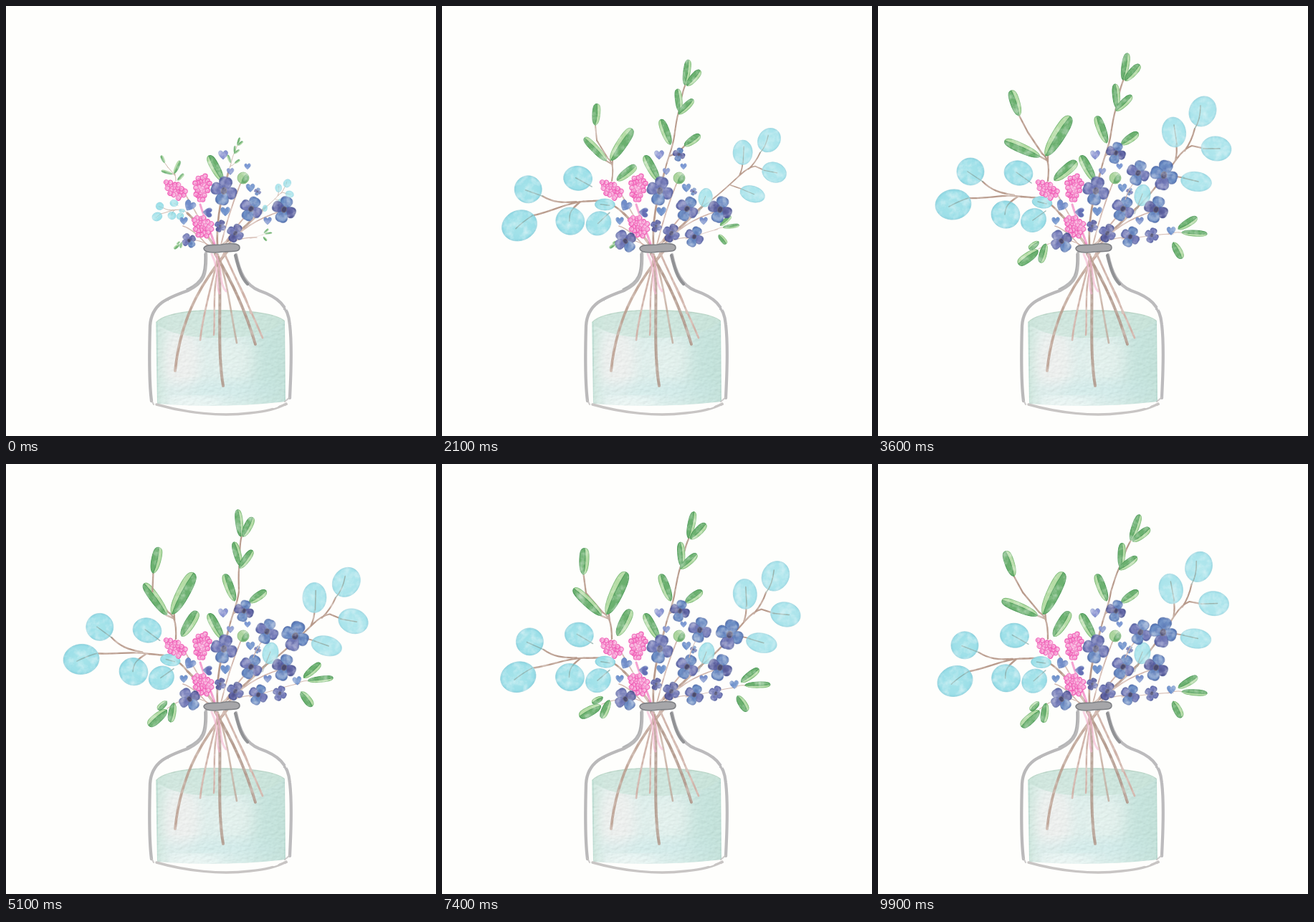
Recreate the animation shown at these times as an HTML page. Size 600 by 600 pixels, loop 10000 ms.

```html
<!DOCTYPE html>
<html lang="en">
<head>
<meta charset="utf-8">
<title>Bouquet in a glass jar</title>
<style>
  html, body { margin: 0; width: 100%; height: 100%; overflow: hidden; background: #fefefc; }
  svg { display: block; width: 100vw; height: 100vh; }
  .line { fill: none; stroke-linecap: round; stroke-linejoin: round; }
</style>
</head>
<body>
<svg id="stage" viewBox="0 0 600 600" xmlns="http://www.w3.org/2000/svg">
  <defs>
    <filter id="wash" filterUnits="userSpaceOnUse" x="0" y="0" width="600" height="600" color-interpolation-filters="sRGB">
      <feTurbulence type="fractalNoise" baseFrequency=".1" numOctaves="3" seed="4"/>
      <feColorMatrix values="0 0 0 0 1  0 0 0 0 1  0 0 0 0 1  1 0 0 0 -.4"/>
      <feComposite in2="SourceAlpha" operator="in" result="light"/>
      <feMerge><feMergeNode in="SourceGraphic"/><feMergeNode in="light"/></feMerge>
    </filter>
    <filter id="paper" filterUnits="userSpaceOnUse" x="190" y="410" width="215" height="160" color-interpolation-filters="sRGB">
      <feTurbulence type="fractalNoise" baseFrequency=".16 .24" numOctaves="2" seed="9"/>
      <feDiffuseLighting surfaceScale=".9" lighting-color="#fff" result="relief">
        <feDistantLight azimuth="235" elevation="60"/>
      </feDiffuseLighting>
      <feComposite in="SourceGraphic" in2="relief" operator="arithmetic" k2="1" k3=".2" k4="-.17"/>
      <feComposite in2="SourceAlpha" operator="in"/>
    </filter>
    <filter id="rough" filterUnits="userSpaceOnUse" x="180" y="320" width="240" height="260" color-interpolation-filters="sRGB">
      <feTurbulence type="fractalNoise" baseFrequency=".06" numOctaves="1" seed="2"/>
      <feDisplacementMap in="SourceGraphic" scale="2" xChannelSelector="R" yChannelSelector="G"/>
    </filter>
    <filter id="soft" x="-50%" y="-50%" width="200%" height="200%"><feGaussianBlur stdDeviation="9"/></filter>
    <radialGradient id="disc">
      <stop offset="0" stop-color="#a3e3e9"/><stop offset=".85" stop-color="#97dee7"/><stop offset="1" stop-color="#85d0de"/>
    </radialGradient>
    <radialGradient id="petalBlue">
      <stop offset="0" stop-color="#5675b4"/><stop offset=".7" stop-color="#678bc4"/><stop offset="1" stop-color="#4c6eb0"/>
    </radialGradient>
    <radialGradient id="petalViolet">
      <stop offset="0" stop-color="#5f68aa"/><stop offset=".7" stop-color="#7379b9"/><stop offset="1" stop-color="#535ca0"/>
    </radialGradient>
    <radialGradient id="petalDark">
      <stop offset="0" stop-color="#494e8e"/><stop offset=".7" stop-color="#5d62a5"/><stop offset="1" stop-color="#464b8c"/>
    </radialGradient>
    <linearGradient id="waterTone">
      <stop offset="0" stop-color="#c9e3d8"/><stop offset=".12" stop-color="#dfedea"/>
      <stop offset=".6" stop-color="#d9ece9"/><stop offset="1" stop-color="#c2dfd7"/>
    </linearGradient>
    <clipPath id="waterEdge">
      <path d="M209 441C222 427 265 423 300 424C340 424 378 429 389 439L390 552Q300 562 211 555Z"/>
    </clipPath>
  </defs>
  <g id="water" clip-path="url(#waterEdge)"></g>
  <g id="plants" filter="url(#wash)"></g>
  <g id="glass" filter="url(#rough)"></g>
</svg>
<script>
const LOOP = 10000, STEP = 100;
const BEATS = [0, 2.1, 3.6, 5.1, 7.4, 8.3, 9.9];
const STILL = [0, 0, 0, 0, 0, 0, 0];
const BROWN = '#b89a8b', ROSE = '#cfb2a8', TAUPE = '#ad9385';
const plants = document.getElementById('plants');
const parts = [];

function add(parent, tag, attrs) {
  const node = document.createElementNS('http://www.w3.org/2000/svg', tag);
  for (const key in attrs) node.setAttribute(key, attrs[key]);
  return parent.appendChild(node);
}

function line(parent, d, width = 2, stroke = BROWN, opacity = 1) {
  return add(parent, 'path', { class: 'line', d, stroke, 'stroke-width': width, opacity });
}

// A group that turns and grows about one point; grow = [first scale, start s, end s].
function part(parent, x, y, sway = STILL, grow = [1, 0, 1]) {
  const node = add(parent, 'g', {});
  parts.push({ node, x, y, sway, grow });
  return node;
}

function leaf(parent, x1, y1, x2, y2, w, flip = 1) {
  const len = Math.hypot(x2 - x1, y2 - y1);
  const turn = Math.atan2(y2 - y1, x2 - x1) * 180 / Math.PI;
  const g = add(parent, 'g', { transform: `translate(${x1} ${y1}) rotate(${turn})` });
  const h = w / 2 * flip;
  const side = s => `M0 0C${len * .05} ${-s * .8} ${len * .3} ${-s} ${len * .6} ${-s}C${len * .88} ${-s} ${len} ${-s * .75} ${len} 0`;
  add(g, 'path', { d: side(-h), fill: '#b5dca5', stroke: '#80bd7c', 'stroke-width': 1 });
  add(g, 'path', { d: `${side(h)}Q${len * .5} ${h * .5} 0 0Z`, fill: '#6bb06f', stroke: '#519c5c', 'stroke-width': 1 });
}

function disc(parent, x, y, rx, ry, turn = 0, opacity = .95) {
  add(parent, 'ellipse', { cx: x, cy: y, rx, ry, fill: 'url(#disc)', stroke: '#86ccd8',
    'stroke-width': .7, opacity, transform: `rotate(${turn} ${x} ${y})` });
}

function flower(parent, x, y, r, turn = 0, tones = ['Blue', 'Violet']) {
  const g = add(parent, 'g', { transform: `translate(${x} ${y}) rotate(${turn}) scale(${r / 20})` });
  for (let i = 0; i < 4; i++) {
    add(g, 'path', { d: 'M0 3C-4 -1 -9 -7 -9 -13C-9 -18 -4 -20 0 -19C5 -20 9 -17 9 -12C8 -6 4 -1 0 3Z',
      transform: `rotate(${i * 90 + (i % 2 ? 6 : 0)}) scale(${i % 2 ? .92 : 1})`,
      fill: `url(#petal${tones[i % tones.length]})`, stroke: '#52669f', 'stroke-width': .5, opacity: .94 });
  }
  add(g, 'ellipse', { cx: 0, cy: 0, rx: 3.6, ry: 4.4, fill: '#4a4a70', stroke: '#6f6e80', 'stroke-width': 1 });
}

function heart(parent, x, y, s, fill = '#7093cd', turn = 0) {
  add(parent, 'path', { d: 'M0 5C-7 0 -6 -5 -3 -5C-1 -5 0 -3 0 -2C0 -4 2 -6 4 -5C7 -3 5 1 0 5Z', fill,
    stroke: '#6583bd', 'stroke-width': .5, transform: `translate(${x} ${y}) rotate(${turn}) scale(${s / 10})` });
}

function cluster(x, y, rx, ry, turn) {
  const g = add(plants, 'g', { transform: `translate(${x} ${y}) rotate(${turn})` });
  const n = Math.round(rx * ry / 7);
  for (let i = 0; i < n; i++) {
    const d = Math.sqrt((i + .5) / n), a = i * 2.4;
    const cy = d * ry * Math.sin(a), cx = d * rx * Math.cos(a) * (1 - .25 * cy / ry);
    add(g, 'circle', { cx, cy, r: 3.2, fill: '#f58ccb', stroke: '#f05cb5', 'stroke-width': 1.1 });
    add(g, 'path', { class: 'line', d: `M${cx - 1.5} ${cy + .8}q.4 -2.8 2.8 -1.6`, stroke: '#fac6e6', 'stroke-width': 1 });
  }
}

function drawWater() {
  const g = add(document.getElementById('water'), 'g', { filter: 'url(#paper)' });
  add(g, 'rect', { x: 205, y: 420, width: 190, height: 142, fill: 'url(#waterTone)' });
  const blot = (cx, cy, rx, ry, fill, opacity) =>
    add(g, 'ellipse', { cx, cy, rx, ry, fill, opacity, filter: 'url(#soft)' });
  blot(246, 495, 25, 45, '#f1efee', .75);
  blot(318, 493, 32, 28, '#eaf2ee', .5);
  blot(367, 500, 22, 50, '#bfe0d9', .5);
  blot(300, 536, 85, 9, '#c9e7e8', .55);
  blot(265, 553, 40, 5, '#fff', .9);
  add(g, 'path', { d: 'M209 442C222 427 265 423 300 424C340 424 378 429 389 439C370 457 340 463 299 463C255 463 224 457 209 442Z',
    fill: '#c8e2d8', opacity: .65 });
  line(g, 'M210 441C222 428 265 424 300 425C340 425 378 429 388 439', 1.4, '#b9d4c5', .8);
  line(g, 'M211 442V552M389 441V550', 2, '#b2d6cb', .5);
}

function drawStems() {
  line(plants, 'M309 342C285 373 245 420 236 509', 3.7, BROWN, .85);
  line(plants, 'M295 347C303 395 293 470 303 530', 4, TAUPE, .85);
  line(plants, 'M292 346C313 380 334 425 348 472', 3.9, TAUPE, .9);
  line(plants, 'M306 348C325 390 344 430 358 463', 2.8, ROSE);
  line(plants, 'M296 348C289 385 275 425 271 466', 2.6, ROSE);
  line(plants, 'M304 345C285 385 293 425 290 459', 2.4, ROSE);
  line(plants, 'M297 350C310 390 314 430 322 470', 2.6, BROWN, .7);
  line(plants, 'M306 347C318 380 337 403 341 429', 1.8, ROSE);
  line(plants, 'M287 346C299 370 292 390 298 401M293 347C303 373 297 387 307 398', 3, '#f4b3cf', .6);
  line(plants, 'M291 335C279 318 266 301 253 289M301 334C332 312 348 293 362 281', 3.1, BROWN);
  line(plants, 'M289 335C275 305 258 275 240 246M281 334C271 322 259 311 247 307', 1.6, ROSE);
  line(plants, 'M295 333C293 300 300 266 311 230', 2.7, BROWN);
  line(plants, 'M300 333C308 300 318 270 328 246M304 333C318 311 331 296 342 285M309 333C326 314 347 297 388 285', 1.8, ROSE);
  line(plants, 'M284 334Q270 326 256 326M306 334Q326 322 350 323', 1.2, ROSE);
  line(plants, 'M291 332C286 315 278 300 271 277M291 333L285 315', 3, '#f177bd', .7);
}

function drawLeftDiscs() {
  const g = part(plants, 253, 289, [-7.5, -7, 0, 1, -5, -5.5, -6], [.29, 0, 2]);
  line(g, 'M253 289C244 278 232 267 213 267L200 266M195 266Q189 270 183 275', 2.5);
  disc(g, 178, 291, 20, 19, 20);
  disc(g, 196, 233, 20, 17, 12);
  disc(g, 217, 299, 18, 16, -28);
  disc(g, 229, 274, 14, 8, 8);
  line(g, 'M185 274Q178 278 177 291M214 247L193 232M234 286L216 299M235 276L223 273', 1.5, '#87a9a6', .8);
  const outer = part(g, 200, 266, [-6, -7, 0, 1.2, -4.5, -6, -6.5]);
  line(outer, 'M200 266C176 262 156 269 126 268M190 264C170 261 158 257 146 245', 2.3);
  disc(outer, 105, 277, 25, 21, -8);
  disc(outer, 129, 231, 19, 19);
  line(outer, 'M126 268Q111 273 99 280M146 245L125 231', 1.5, '#87a9a6', .8);
}

function drawRightDiscs() {
  const grow = [.28, .85, 2.7], pale = .82;
  const top = part(plants, 362, 281, [8, 11, 0, 10, 5.5, 1.3, -2.3], grow);
  line(top, 'M362 281C382 262 401 235 417 213C425 202 432 197 438 195L456 199M428 202Q438 188 442 171M415 215Q418 203 416 193', 2.2);
  disc(top, 413, 176, 16.5, 21, -10, pale);
  disc(top, 453, 147, 18.5, 21.5, 25, pale);
  disc(top, 472, 199, 21, 17, 8, pale);
  line(top, 'M417 193L413 166M442 171Q450 159 450 139M454 199H477', 1.5, '#94aaa2', .85);
  const low = part(plants, 362, 281, [4, 9, 0, 6, 3.2, .5, -1], grow);
  line(low, 'M405 236L428 240', 1.8);
  disc(low, 444, 245, 21.5, 13.5, 8, pale);
  line(low, 'M426 240L447 245', 1.5, '#94aaa2', .8);
  const small = part(plants, 358, 290, STILL, [.3, .5, 2.7]);
  disc(small, 369, 264, 11, 15, 10, pale);
  line(small, 'M358 290L369 262', 1.2, '#a8b6b0', .8);
}

function drawLeftBlades() {
  const bend = [0, 20, 0, 34, 27, 15, 5];
  const body = part(plants, 237, 244, [-8, 2, 0, -4, -7, -7, -6], [.3, .5, 2.9]);
  line(body, 'M237 244C240 219 236 211 229 206L209 176M237 216L226 210M237 218V207', 2.3);
  leaf(part(body, 227, 211, bend), 226, 210, 177, 188, 13);
  leaf(body, 234, 209, 268, 154, 18, -1);
  const tip = part(body, 209, 176, bend);
  line(tip, 'M209 176L197 153', 2.3);
  leaf(tip, 197, 153, 186, 118, 13);
  const side = part(body, 237, 244, [0, 0, 0, -14, -16, -13, -11]);
  leaf(side, 246, 243, 277, 217, 14);
}

function drawTopBlades() {
  const base = part(plants, 311, 230, STILL, [.29, .7, 2.4]);
  line(base, 'M311 230C315 210 322 200 325 178M318 208Q332 203 341 192', 2.2);
  leaf(base, 319, 191, 305, 154, 12, -1);
  leaf(base, 340, 193, 363, 177, 11);
  const upper = part(base, 325, 178, [8, -1, 0, -10.5, 1.5, 6.5, 8.2]);
  line(upper, 'M325 178C328 160 329 150 333 140C336 125 337 115 343 102', 2.2);
  leaf(upper, 334, 143, 331, 109, 10);
  leaf(upper, 332, 146, 354, 125, 10);
  const crown = part(upper, 340, 108, [0, 0, 0, -5, 1, 1.5, 2]);
  leaf(crown, 342, 103, 348, 66, 10);
  leaf(crown, 345, 104, 365, 82, 11);
}

function drawLowBlades() {
  const right = part(plants, 340, 325, [-12, -11, 0, -9.5, -5, -1.5, 1], [.27, .9, 3.25]);
  line(right, 'M340 325C370 323 390 318 412 318M405 318Q420 314 425 317', 1, ROSE);
  leaf(right, 419, 311, 445, 295, 10);
  leaf(right, 424, 316, 459, 318, 8);
  leaf(right, 412, 330, 424, 352, 11, -1);
  heart(part(right, 409, 314, STILL, [0, 2.1, 3.2]), 409, 314, 11);

  const left = part(plants, 250, 328, [-4, 0, 0, -5, 8, 3, -7], [.3, 2.1, 3.4]);
  line(left, 'M250 328Q235 332 224 339', 1, ROSE);
  leaf(left, 223, 341, 196, 360, 13);
  leaf(left, 224, 329, 211, 339, 8);
  leaf(left, 234, 332, 227, 358, 10, -1);
}

function drawBlooms() {
  leaf(plants, 302, 244, 283, 209, 12, -1);
  add(plants, 'circle', { cx: 331, cy: 240, r: 8, fill: '#abd49d', stroke: '#83b87c', 'stroke-width': .8 });
  add(plants, 'path', { d: 'M328 248Q329 238 336 234Q342 242 334 247Z', fill: '#6aac6e' });
  cluster(236, 256, 9, 17, 128);
  cluster(273, 254, 10, 19, 8);
  cluster(274, 307, 12, 16, 145);
  const dark = ['Dark', 'Violet'];

  heart(plants, 303, 208, 12, '#8b94d2');
  heart(plants, 313, 231, 9, '#8190cc');
  heart(plants, 337, 224, 8, '#7b98d4');
  heart(plants, 341, 254, 11);
  heart(plants, 256, 279, 14, '#718dc9', 30);
  heart(plants, 281, 288, 12, '#646fb5', 95);
  heart(plants, 248, 300, 10);
  heart(plants, 306, 287, 12);
  heart(plants, 365, 300, 10, '#778ecb');
  flower(plants, 351, 259, 5.5, 20);

  flower(plants, 299, 307, 9, 25, dark);
  flower(plants, 304, 258, 20.5, 12, ['Violet', 'Violet', 'Blue']);
  flower(plants, 342, 283, 18, 28);
  flower(plants, 388, 284, 19, 18, ['Blue', 'Dark']);
  flower(plants, 320, 317, 13.5, 25, dark);
  flower(part(plants, 254, 326, STILL, [.65, 0, 1.7]), 256, 328, 17, -35, ['Violet', 'Dark', 'Blue']);
  flower(part(plants, 345, 322, STILL, [0, .5, 1.9]), 352, 322, 15, 25);
  flower(part(plants, 328, 211, STILL, [0, .8, 3]), 332, 205, 15.5, 15, ['Blue', 'Dark']);
  flower(part(plants, 376, 321, STILL, [0, 2.1, 3.1]), 382, 320, 11, 22, ['Violet']);
  const mid = part(plants, 345, 270, [0, 0, 0, 2, -5, -1, 5], [0, 2.1, 3.2]);
  line(mid, 'M345 270Q350 255 358 245', 1.2, ROSE);
  flower(mid, 363, 233, 18, 18);
  const high = part(plants, 362, 281, [0, 0, 0, 6, 3, .8, -1.6]);
  flower(part(high, 393, 246, STILL, [0, 2.1, 3.3]), 399, 236, 21.5, 12, ['Blue', 'Blue', 'Violet']);
}

function drawGlass() {
  const g = document.getElementById('glass');
  line(g, 'M279 345C280 374 277 386 254 397C226 407 203 415 201 446C200 480 199 520 203 551', 4.3, '#b3b2b3', .9);
  line(g, 'M277 346C278 373 274 385 252 395', 1.4, '#88898d', .6);
  line(g, 'M321 347C326 372 334 389 353 397C379 406 394 418 396 445C400 480 397 520 396 547', 4.2, '#b5b4b6', .9);
  line(g, 'M320 348C325 368 329 380 337 388', 4.3, '#8b8c8f', .9);
  line(g, 'M210 556C252 568 300 573 340 568C363 566 380 561 391 555', 3.4, '#bfbbba', .85);
  line(g, 'M203 550L206 556M389 552L396 546', 2, '#c4c1c1', .8);
  add(g, 'path', { d: 'M276 338C278 332 290 334 300 333C312 331 326 330 326 337C326 344 315 342 302 343C288 345 276 344 276 338Z',
    fill: '#a6a6a9', stroke: '#7f8185', 'stroke-width': 1.6 });
}

// Smooth curve through the sway values.
function swayAt(v, t) {
  const last = BEATS.length - 1;
  let i = 0;
  while (i < last - 1 && t >= BEATS[i + 1]) i++;
  const slope = k => k === 0 || k === last ? 0 : (v[k + 1] - v[k - 1]) / (BEATS[k + 1] - BEATS[k - 1]);
  const span = BEATS[i + 1] - BEATS[i], u = Math.min(1, (t - BEATS[i]) / span), w = 1 - u;
  return v[i] * w * w * (1 + 2 * u) + v[i + 1] * u * u * (3 - 2 * u)
    + span * u * w * (slope(i) * w - slope(i + 1) * u);
}

function growAt([first, start, end], t) {
  const u = Math.max(0, Math.min(1, (t - start) / (end - start)));
  return first + (1 - first) * u * u * (3 - 2 * u);
}

function pose(t) {
  for (const { node, x, y, sway, grow } of parts) {
    node.setAttribute('transform',
      `translate(${x} ${y}) rotate(${swayAt(sway, t)}) scale(${growAt(grow, t)}) translate(${-x} ${-y})`);
  }
}

drawWater();
drawStems();
drawLeftDiscs();
drawRightDiscs();
drawLeftBlades();
drawTopBlades();
drawLowBlades();
drawBlooms();
drawGlass();

const began = performance.now();
let shown = -1;
function tick() {
  const step = Math.floor(((performance.now() - began) % LOOP) / STEP);
  if (step !== shown) pose((shown = step) * STEP / 1000);
  requestAnimationFrame(tick);
}
tick();
</script>
</body>
</html>
```
